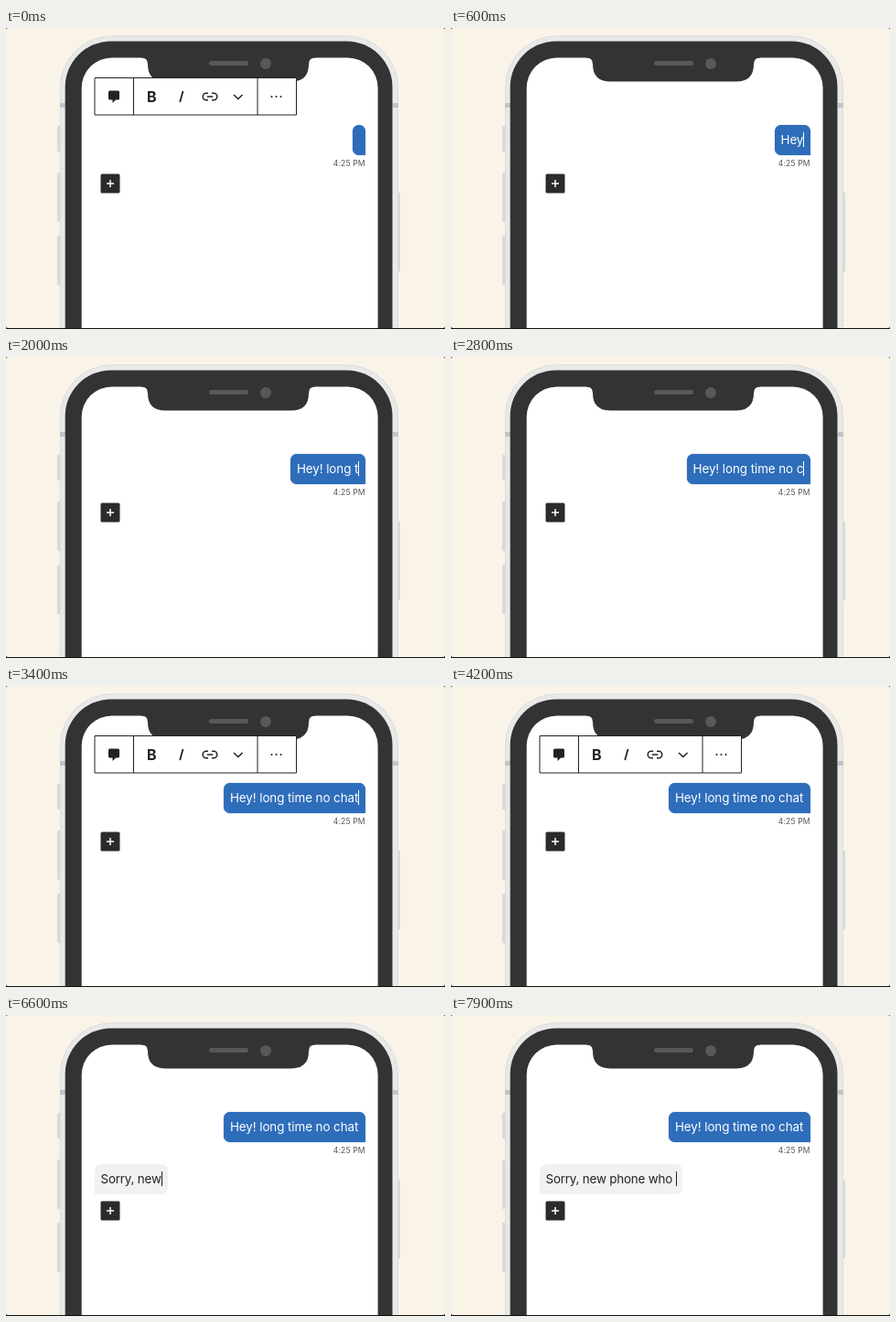
Recreate the animation shown at these times as an HTML page. Size 480 px wide and 329 px high, loop 8000 ms.

```html
<!DOCTYPE html>
<html lang="en">
<head>
<meta charset="utf-8">
<style>
  html, body { margin: 0; width: 100%; height: 100%; overflow: hidden; background: #111; }
  body { position: relative; font-family: Inter, "Liberation Sans", sans-serif; }
  svg { position: absolute; left: 0; top: 0; }
  .bubble {
    position: absolute; box-sizing: border-box; height: 33px; line-height: 33px;
    font-size: 13.4px; white-space: pre;
  }
  #sent {
    right: calc(100% - 393px); top: 106px; padding: 0 7.7px 0 6.8px; letter-spacing: -.07px;
    color: #fff; background: #2e6dba; border-radius: 7px 7px 1px 7px; box-shadow: 0 0 1px #2e6dba;
  }
  #reply {
    left: 97px; top: 163px; padding: 0 7.3px 0 6.5px; letter-spacing: -.19px;
    color: #222; background: #f1f1f1; border-radius: 7px 7px 7px 1px;
  }
  .caret::after {
    content: ""; display: inline-block; width: 1px; height: 16px;
    margin-right: -1px; vertical-align: -3px; background: currentColor;
  }
</style>
</head>
<body>
<svg width="480" height="329" viewBox="0 0 480 329">
  <rect width="480" height="328" rx="2" fill="#faf3e8"/>
  <clipPath id="stage"><rect width="480" height="328"/></clipPath>
  <g clip-path="url(#stage)">
    <!-- side buttons -->
    <g fill="#d9d9d9">
      <rect x="56" y="107" width="6" height="28" rx="1"/>
      <rect x="56" y="158" width="6" height="54" rx="1"/>
      <rect x="56" y="227" width="6" height="54" rx="1"/>
      <rect x="426" y="180" width="5" height="86" rx="1"/>
    </g>
    <!-- body -->
    <rect x="59.5" y="8.8" width="369" height="400" rx="56" fill="#e9e9ea" stroke="#dcdcde"/>
    <path d="M59 84.5h6M423 84.5h6" stroke="#c4c4c6" stroke-width="5"/>
    <rect x="64.7" y="14.5" width="357.8" height="400" rx="50" fill="#333"/>
    <rect x="82.7" y="32.4" width="323.9" height="400" rx="33" fill="#fff"/>
    <!-- notch -->
    <path d="M148 31v1.4q7 0 7 7q0 19 19 19h138q19 0 19-19q0-7 7-7v-1.4z" fill="#333"/>
    <rect x="222" y="36" width="43" height="5" rx="2.5" fill="#585858"/>
    <circle cx="284" cy="39" r="6" fill="#585858"/>
  </g>
  <text x="392.7" y="150.5" font-size="8.6" letter-spacing=".13" text-anchor="end" fill="#555">4:25 PM</text>
  <g id="add">
    <rect x="103.5" y="159.5" width="21" height="21" rx="1.5" fill="#2b2b2b"/>
    <path d="M110 170h8M114 166v8" stroke="#fff" stroke-width="1.5"/>
  </g>
  <g id="toolbar" fill="none" stroke="#222">
    <path d="M97 54.5h220.5v40.5h-220.5zM139.5 54.5v40.5M275 54.5v40.5" fill="#fff"/>
    <path d="M113.5 68.5h9q1.5 0 1.5 1.5v7q0 1.5-1.5 1.5h-2.5l-3.5 3.5v-3.5h-3q-1.5 0-1.5-1.5v-7q0-1.5 1.5-1.5z" fill="#222" stroke="none"/>
    <text x="159.3" y="80.5" font-size="16" font-weight="700" text-anchor="middle" fill="#222" stroke="none">B</text>
    <path d="M193.5 69l-3.3 12" stroke-width="1.8"/>
    <path d="M221 71.2h-2a3.8 3.8 0 0 0 0 7.6h2M225 71.2h2a3.8 3.8 0 0 1 0 7.6h-2M219.8 75h6.4" stroke-width="1.5"/>
    <path d="M249 73l4.8 4.5 4.8-4.5" stroke-width="1.5"/>
    <path d="M290.5 75h.01M295.5 75h.01M300.5 75h.01" stroke-width="2" stroke-linecap="round"/>
  </g>
</svg>
<div id="sent" class="bubble"></div>
<div id="reply" class="bubble"></div>
<script>
  const LOOP = 8000, ENTER = 4600;
  const $ = id => document.getElementById(id);

  // Each number is the moment, in tenths of a second, when a key is pressed.
  const messages = [
    { el: $('sent'), text: 'Hey! long time no chat', from: 200, until: 3700,
      keys: [2, 4, 6, 8, 10, 12, 14, 15, 16, 18, 20, 21, 22, 23, 24, 25, 26, 27, 28, 29, 30, 32] },
    { el: $('reply'), text: 'Sorry, new phone who ', from: ENTER, until: LOOP,
      keys: [50, 51, 52, 54, 56, 60, 62, 64, 65, 66, 68, 69, 70, 72, 73, 74, 75, 76, 77, 78, 79] }
  ];

  const show = (el, on) => { el.style.visibility = on ? 'visible' : 'hidden'; };

  function draw() {
    const t = performance.now() % LOOP;
    for (const { el, text, keys, from, until } of messages) {
      el.textContent = text.slice(0, keys.filter(k => k * 100 <= t).length);
      el.classList.toggle('caret', t >= from && t < until);
    }
    show($('reply'), t >= ENTER);
    show($('toolbar'), t < 200 || (t >= 3400 && t < ENTER));
    $('add').setAttribute('transform', `translate(0 ${t < ENTER ? 0 : 44})`);
    requestAnimationFrame(draw);
  }
  draw();
</script>
</body>
</html>
```
